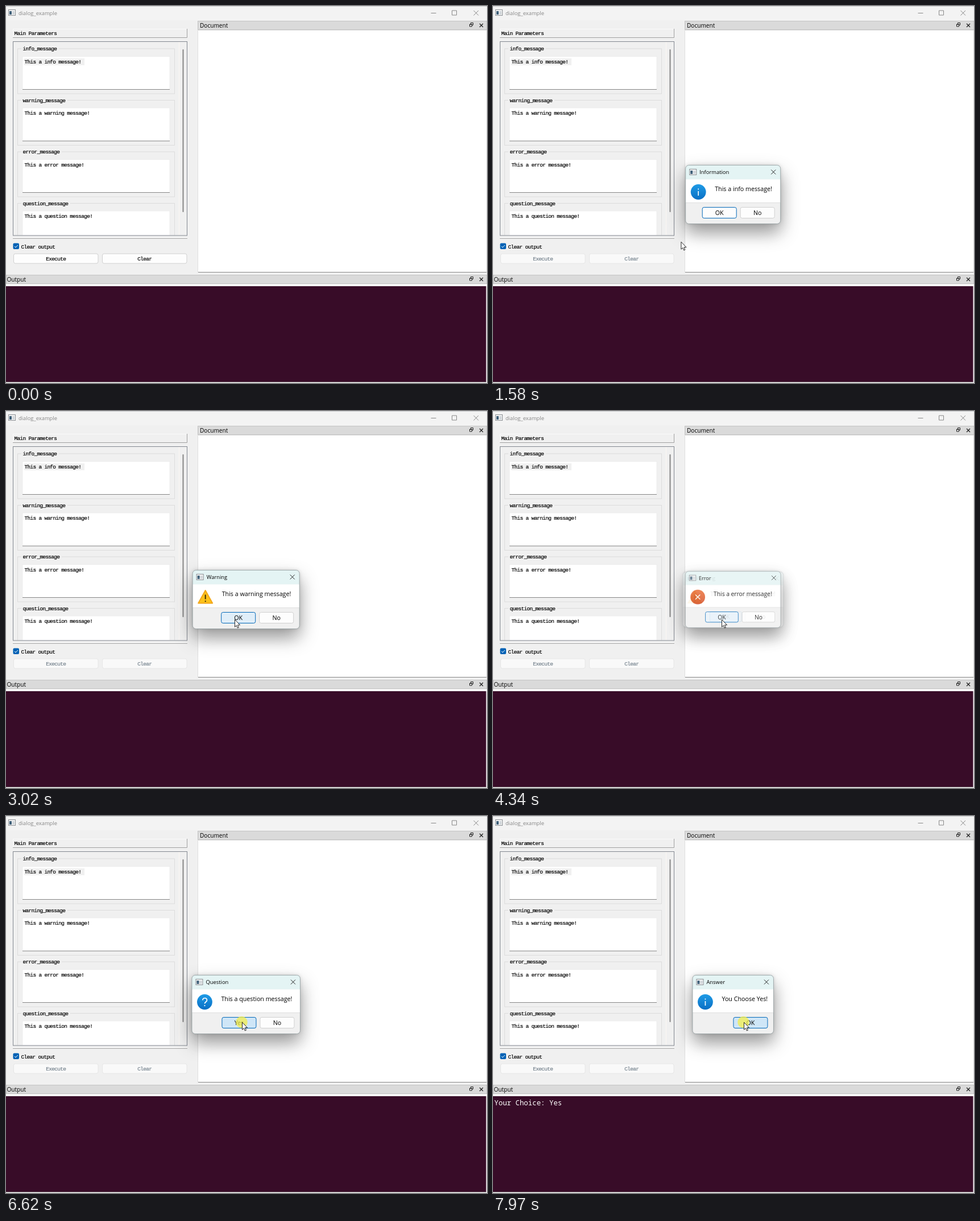
Animation of 846x662 px, one loop 8000 ms. Source, as an HTML page:

```html
<!DOCTYPE html>
<html lang="en">
<head>
<meta charset="utf-8">
<title>Message dialogs</title>
<style>
html, body { margin: 0; width: 100%; height: 100%; overflow: hidden; background: #f0f0f0; }
svg { display: block; width: 846px; height: 662px; }
text { white-space: pre; }
.ui { font-family: "Open Sans", "Noto Sans", sans-serif; font-size: 10.7px; }
.cap { font-size: 9.4px; }
.dock { font-size: 10.1px; }
.fix { font-family: "Liberation Mono", monospace; font-size: 9.4px; letter-spacing: -.64px; stroke: currentColor; stroke-width: .2px; }
.con { font-family: "Noto Sans Mono", "DejaVu Sans Mono", monospace; font-size: 12.4px; fill: #fff; }
.mid { text-anchor: middle; }
.shade { filter: drop-shadow(0 15px 16px rgba(0,0,0,.38)) drop-shadow(0 0 3px rgba(0,0,0,.16)); }
</style>
</head>
<body>
<svg id="stage" viewBox="0 0 846 662" xmlns="http://www.w3.org/2000/svg"></svg>
<script>
const LOOP = 8000;
const stage = document.getElementById('stage');
const $ = id => document.getElementById(id);

// Drawing helpers
const rect = (x, y, w, h, fill, more = '') =>
  `<rect x="${x}" y="${y}" width="${w}" height="${h}" fill="${fill}" ${more}/>`;
const path = (d, stroke, width = 1, more = '') =>
  `<path d="${d}" fill="none" stroke="${stroke}" stroke-width="${width}" ${more}/>`;
const text = (x, y, cls, str, more = '') =>
  `<text x="${x}" y="${y}" class="${cls}" ${more}>${str}</text>`;
const cross = (x, y, r, color, width = 1) =>
  path(`M${x - r} ${y - r}l${2 * r} ${2 * r}m0 ${-2 * r}l${-2 * r} ${2 * r}`, color, width);

const appIcon = (x, y) =>
  rect(x + .5, y + .5, 12, 10, '#f4f4f4', 'stroke="#8b8f94"') +
  rect(x + 2, y + 3, 4, 6, '#3f6079') + rect(x + 7, y + 3, 4, 6, '#d3d8dc');

function dock(x, y, label) {
  return rect(x + .5, y + .5, 845.5 - x, 15, '#dadada', 'stroke="#c4c4c4"') +
    text(x + (x ? 4 : 1.5), y + 12, 'ui dock', label) +
    path(`M817.5 ${y + 5.5}v-2h4v4h-2M815.5 ${y + 6}h4v4h-4zM815 ${y + 6.5}h5`, '#222') +
    cross(836, y + 8, 3, '#222', 1.3);
}

function group(kind, i) {
  const y = 75 + 90.5 * i;
  return rect(20.5, y, 276, 79, 'none', 'stroke="#dcdcdc"') +
    rect(27, y - 4, kind.length * 5 + 46, 8, '#f0f0f0') +
    text(29.5, y + 3.2, 'fix', kind + '_message') +
    rect(29, y + 13.5, 259, 58, '#fff', 'stroke="#e6e6e6" stroke-width=".6"') +
    path(`M29 ${y + 71.5}h259`, '#868686') +
    (i ? '' : rect(32, 92, 106, 12, '#f0f0f0')) +
    text(32.5, y + 25.8, 'fix', `This a ${kind} message!`);
}

const button = (id, x, label) =>
  `<g id="${id}">` + rect(x + .5, 435, 148.5, 17, '#fdfdfd', 'rx="3" stroke="#d0d0d0"') +
  text(x + 74.7, 447, 'fix mid', label) + '</g>';

function symbol(kind, x) {
  const y = 326.5;
  if (kind === 'warning') return `<path d="M${x} ${y - 11.5}l12.5 22.5h-25z" fill="#fcc21b" stroke="#f3a81c" stroke-width="2" stroke-linejoin="round"/>` +
    path(`M${x} ${y - 4}v8m0 2.5v2`, '#3b2c0a', 2);
  const tone = kind === 'error' ? 'red' : 'blue';
  const mark = {
    info: path(`M${x} ${y - 6}v2m0 2.5v8`, '#fff', 1.6),
    error: cross(x, y, 4.3, '#fff', 1.5),
    question: path(`M${x - 3.5} ${y - 3}c0-5 7.5-5 7.5 0c0 3-4 3-4 6m0 2.5v2`, '#fff', 1.7)
  }[kind];
  return `<circle cx="${x}" cy="${y}" r="13.4" fill="url(#${tone})"/>` + mark;
}

// Times: open, close, pointer over the button, press
const dialogs = [
  { kind: 'info', title: 'Information', width: 167, yes: 'OK', open: 1260, close: 2680, over: 1900, press: 2440 },
  { kind: 'warning', title: 'Warning', width: 188, yes: 'OK', open: 2710, close: 4230, over: 2710, press: 3810 },
  { kind: 'error', title: 'Error', width: 174, yes: 'OK', open: 4260, close: 5600, over: 4260, press: 5380 },
  { kind: 'question', title: 'Question', width: 190.5, yes: 'Yes', open: 5630, close: 6760, over: 5700, press: 6520 },
  { kind: 'info', title: 'Answer', width: 142.5, yes: 'OK', say: 'You Choose Yes!', single: true, open: 6810, close: 9000, over: 7690, press: 7870 }
];

function dialog(d, i) {
  const w = d.width, x = 422.2 - w / 2, right = x + w;
  const okX = right - (d.single ? 70.5 : 137.5), noX = right - 70.5;
  const btn = (bx, label, id) =>
    rect(bx, 353.5, 60, 19, '#fdfdfd', `rx="3" stroke="${id ? '#0067b8' : '#d0d0d0'}" ${id}`) +
    text(bx + 30, 367, 'ui mid', label);
  return `<g id="dlg${i}" visibility="hidden">` +
    rect(x, 279.5, w, 103, '#f0f0f0', 'rx="6" class="shade"') +
    `<path d="M${x} 304.5v-19a6 6 0 0 1 6-6h${w - 12}a6 6 0 0 1 6 6v19z" fill="#e4f4f4"/>` +
    rect(x, 304.5, w, 41, '#fff') + path(`M${x} 345.5h${w}`, '#dfdfdf') +
    rect(x, 279.5, w, 103, 'none', 'rx="6" stroke="#8f9a9c" stroke-width=".8"') +
    appIcon(x + 6.5, 286) + text(x + 24.5, 295.3, 'ui cap', d.title) +
    cross(right - 12.5, 291.5, 4, '#222') + symbol(d.kind, x + 22.5) +
    text(x + 51.5, 325, 'ui', d.say || `This a ${d.kind} message!`) +
    btn(okX, d.yes, `id="ok${i}"`) + (d.single ? '' : btn(noX, 'No', '')) + '</g>';
}

const gradient = (id, stops, dir = '') => `<linearGradient id="${id}" ${dir}>` +
  stops.map((c, i) => `<stop offset="${i / (stops.length - 1)}" stop-color="${c}"/>`).join('') + '</linearGradient>';

stage.innerHTML =
  '<defs>' + gradient('bar', ['#ebf4f7', '#e9f5f3', '#f1f5ec', '#e8f4f4']) +
  gradient('blue', ['#1f9be6', '#0a6fc4'], 'x2="0" y2="1"') +
  gradient('red', ['#e8601f', '#cf3a10'], 'x2="0" y2="1"') +
  '<clipPath id="view"><rect x="13" y="63" width="305" height="339.5"/></clipPath></defs>' +
  rect(0, 0, 846, 662, '#f0f0f0') +
  rect(0, 0, 846, 25.5, '#f3f3f3', 'id="bar"') +
  path('M0 .4H846', '#b9bcbd', .8) +
  appIcon(4, 6) + text(22, 16, 'ui cap', 'dialog_example', 'id="title"') +
  '<g id="controls" fill="none" stroke="#888"><path d="M747.5 12.5h9M784.5 8h8v8h-8zM822.5 8l8.5 8.5m0-8.5l-8.5 8.5"/></g>' +
  dock(337, 26, 'Document') +
  rect(337.5, 42.5, 508, 425, '#fff', 'stroke="#dedede"') + path('M338 467.5H845', '#868686') +
  dock(0, 472, 'Output') +
  rect(0, 489, 846, 173, '#fff') + rect(0, 492, 844.5, 168, '#380c28') + path('M0 660.5H845', '#9a9a9a') +
  text(2.3, 508, 'con', 'Your Choice: Yes', 'id="log" visibility="hidden"') +
  path('M12.5 56V40.5H318', '#fafafa') + path('M12 55.5H318.5V40', '#a0a0a0') +
  text(14.5, 51.2, 'fix', 'Main Parameters') +
  '<g clip-path="url(#view)">' + ['info', 'warning', 'error', 'question'].map(group).join('') + '</g>' +
  path('M304.5 63V402', '#fbf7f3') + rect(310.5, 76, 2, 286, '#858585', 'rx="1"') +
  rect(12.5, 62.5, 306, 340.5, 'none', 'stroke="#828790"') +
  path('M12 408.5H319', '#a0a0a0') + path('M12 409.5H319', '#fff') +
  rect(12.5, 416.5, 10.5, 10.5, '#0062b5', 'rx="2"') + path('M15 422l2 2 3.8-4', '#fff') +
  text(26.5, 425.7, 'fix', 'Clear output') +
  button('run', 13, 'Execute') + button('clear', 169, 'Clear') +
  dialogs.map(dialog).join('') +
  '<circle id="halo" r="10.3" fill="#f3ee4e" opacity=".75"/>' +
  '<path id="arrow" d="M.5 .3V13.2L3.4 10.6L5.3 15L7.4 14.1L5.5 9.8H9.6Z" fill="#fff" stroke="#111" stroke-width=".9"/>';

// Motion helpers
const clamp = v => Math.max(0, Math.min(1, v));
const ramp = (t, start, span) => clamp((t - start) / span);
const easeOut = p => 1 - (1 - p) ** 3;
const mix = (a, b, p) => a.map((v, i) => v + (b[i] - v) * p);
const rgb = c => `rgb(${c.map(Math.round)})`;
const PLAIN = [253, 253, 253], HOVER = [224, 238, 249], DOWN = [204, 228, 247];
const fade = (t, over, press) =>
  mix(mix(PLAIN, HOVER, ramp(t, over, 120)), DOWN, ramp(t, press, 120));

const route = [
  [130, 459, 629], [420, 250, 505], [660, 98, 397], [880, 73, 449], [1240, 73, 449],
  [1720, 396, 405], [2100, 402, 368], [2400, 402, 366], [6360, 402, 366], [6500, 415, 362],
  [7630, 415, 362], [7850, 441, 362], [LOOP, 441, 362]
];
const presses = [[960, 1110], [2440, 2660], [3810, 4210], [5380, 5560], [6520, 6740], [7870, LOOP]];

function pointer(t) {
  const i = Math.max(1, route.findIndex(k => t < k[0]));
  const [a, b] = [route[i - 1], route[i]];
  const p = ramp(t, a[0], b[0] - a[0]);
  return mix(a.slice(1), b.slice(1), p * p * (3 - 2 * p));
}

const set = (el, attrs) => { for (const k in attrs) el.setAttribute(k, attrs[k]); };
const show = (id, on) => set($(id), { visibility: on ? 'visible' : 'hidden' });

function paintButton(id, fill, stroke, ink) {
  const [box, label] = $(id).children;
  set(box, { fill, stroke });
  set(label, { fill: ink, color: ink });
}

function render(t) {
  const active = (t >= 960 && t < 1250) || (t >= 6750 && t < 6820);
  set($('bar'), { fill: active ? 'url(#bar)' : '#f3f3f3' });
  set($('title'), { fill: active ? '#111' : '#868686' });
  set($('controls'), { stroke: active ? '#111' : '#888' });

  const locked = t >= 1100;
  const ink = locked ? '#73808c' : '#000';
  if (t >= 1250) paintButton('run', '#f9f9f9', '#e6e6e6', ink);
  else paintButton('run', rgb(fade(t, 800, 960)), t < 800 ? '#d0d0d0' : t < 960 ? '#0078d4' : '#0e5590', ink);
  paintButton('clear', locked ? '#f9f9f9' : '#fdfdfd', locked ? '#e6e6e6' : '#d0d0d0', ink);
  show('log', t >= 6780);

  dialogs.forEach((d, i) => {
    const on = t >= d.open && t < d.close + 170;
    show('dlg' + i, on);
    if (!on) return;
    const grow = easeOut(ramp(t, d.open, 220)), leave = ramp(t, d.close, 170);
    const size = .85 + .15 * grow - .09 * leave;
    set($('dlg' + i), {
      opacity: grow * (1 - leave),
      transform: `translate(422.2 331) scale(${size}) translate(-422.2 -331)`
    });
    set($('ok' + i), { fill: rgb(fade(t, d.over, d.press)) });
  });

  const [x, y] = pointer(t);
  show('arrow', t >= 130);
  set($('arrow'), { transform: `translate(${x} ${y})` });
  show('halo', presses.some(([a, b]) => t >= a && t < b));
  set($('halo'), { cx: x - .5, cy: y });
}

const start = performance.now();
function tick() {
  render((performance.now() - start) % LOOP);
  requestAnimationFrame(tick);
}
tick();
</script>
</body>
</html>
```
